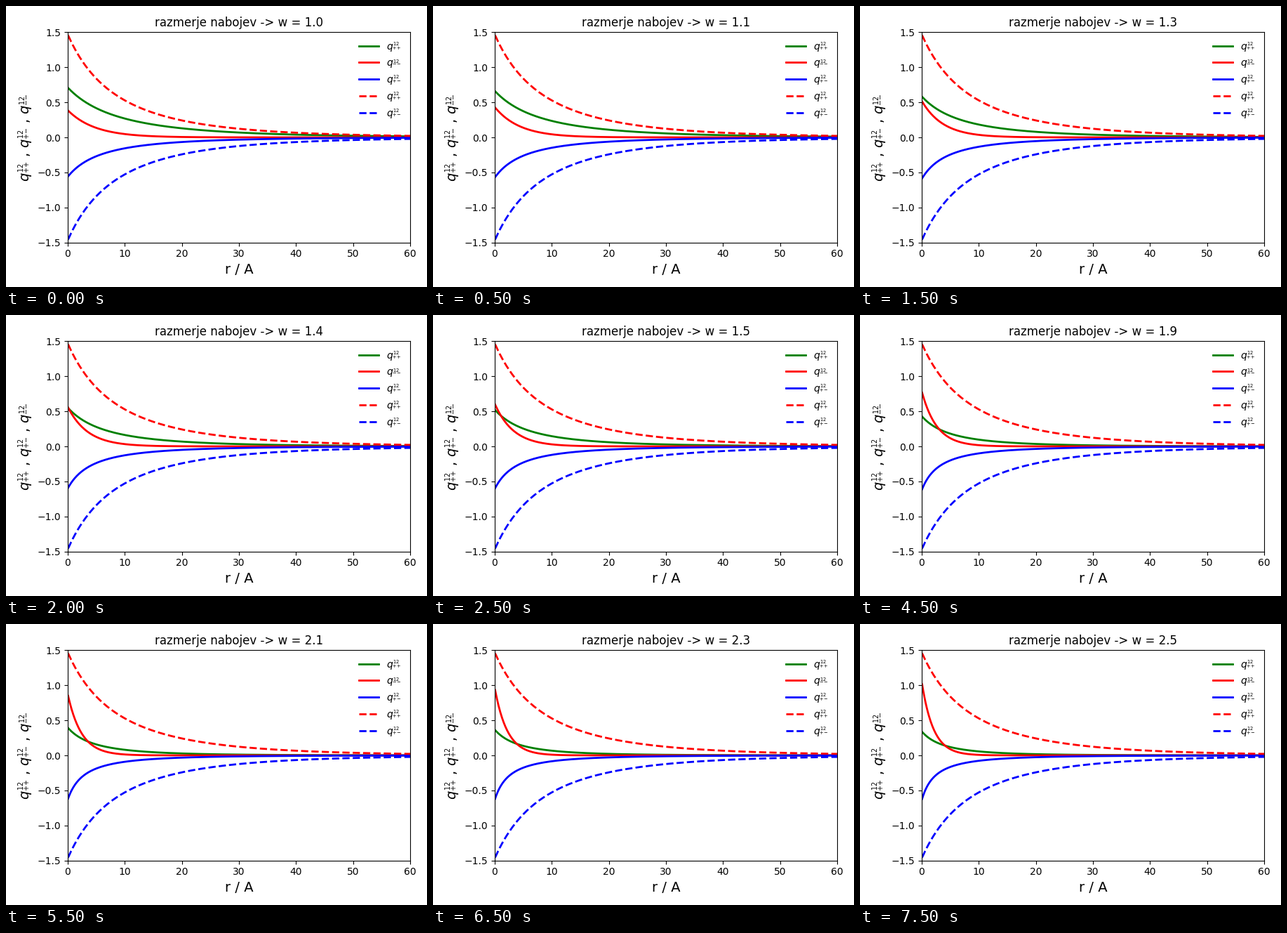
Write a matplotlib script that moves like this. It is 600 by 400 pixels and loops after 8 s.

```python
import numpy as np
import matplotlib.pyplot as plt
from matplotlib.animation import FuncAnimation

FRAMES = 16
INTERVAL = 500

plt.rcParams["font.family"] = "DejaVu Sans"
r = np.linspace(0.1, 60, 600)


def screened(amp, k, a):
    """Exponentially screened decay with a 1/r-like core of width a."""
    return amp * np.exp(-k * r) / (1 + r / a)


def plus_plus(w):
    return screened(1 / (w + 0.4), 0.035 + 0.02 * (w - 1), 11.5 / w)


def minus_minus(w):
    return (0.39 + 0.45 * (w - 1)) * np.exp(-(0.21 + 0.19 * (w - 1)) * r)


def plus_minus(w):
    return -screened(0.705 - 0.14 / w, 0.04 + 0.0067 * (w - 1), 7 / w**1.15)


def symbol(signs):
    """Charge symbol with tiny scripts set close to each other."""
    tight = "".join("{%s}" % s for s in signs)
    return r"$q_{^{%s}}^{_{12}}$" % tight


fig, ax = plt.subplots(figsize=(6, 4), dpi=100)
curves = [
    (plus_plus, ax.plot([], [], "g-", lw=2, label=symbol("++"))[0]),
    (minus_minus, ax.plot([], [], "r-", lw=2, label=symbol("--"))[0]),
    (plus_minus, ax.plot([], [], "b-", lw=2, label=symbol("+-"))[0]),
]

limit = screened(1.475, 0.04, 11.5)
ax.plot(r, limit, "r--", lw=2, label=symbol("++"))
ax.plot(r, -limit, "b--", lw=2, label=symbol("+-"))

ax.set_xlim(0, 60)
ax.set_ylim(-1.5, 1.5)
ax.set_xlabel("r / A", fontsize=14)
ax.set_ylabel(" , ".join(map(symbol, ("++", "+-", "--"))), fontsize=14)
title = ax.set_title("razmerje nabojev -> w = 1.0", fontsize=12)
ax.legend(loc="upper right", frameon=False, fontsize=10)
fig.tight_layout()


def update(i):
    w = 1 + 0.1 * i
    for formula, line in curves:
        line.set_data(r, formula(w))
    title.set_text(f"razmerje nabojev -> w = {w:.1f}")
    return [line for _, line in curves] + [title]


anim = FuncAnimation(fig, update, frames=FRAMES, interval=INTERVAL,
                     repeat=True, repeat_delay=0)
plt.show()
```
